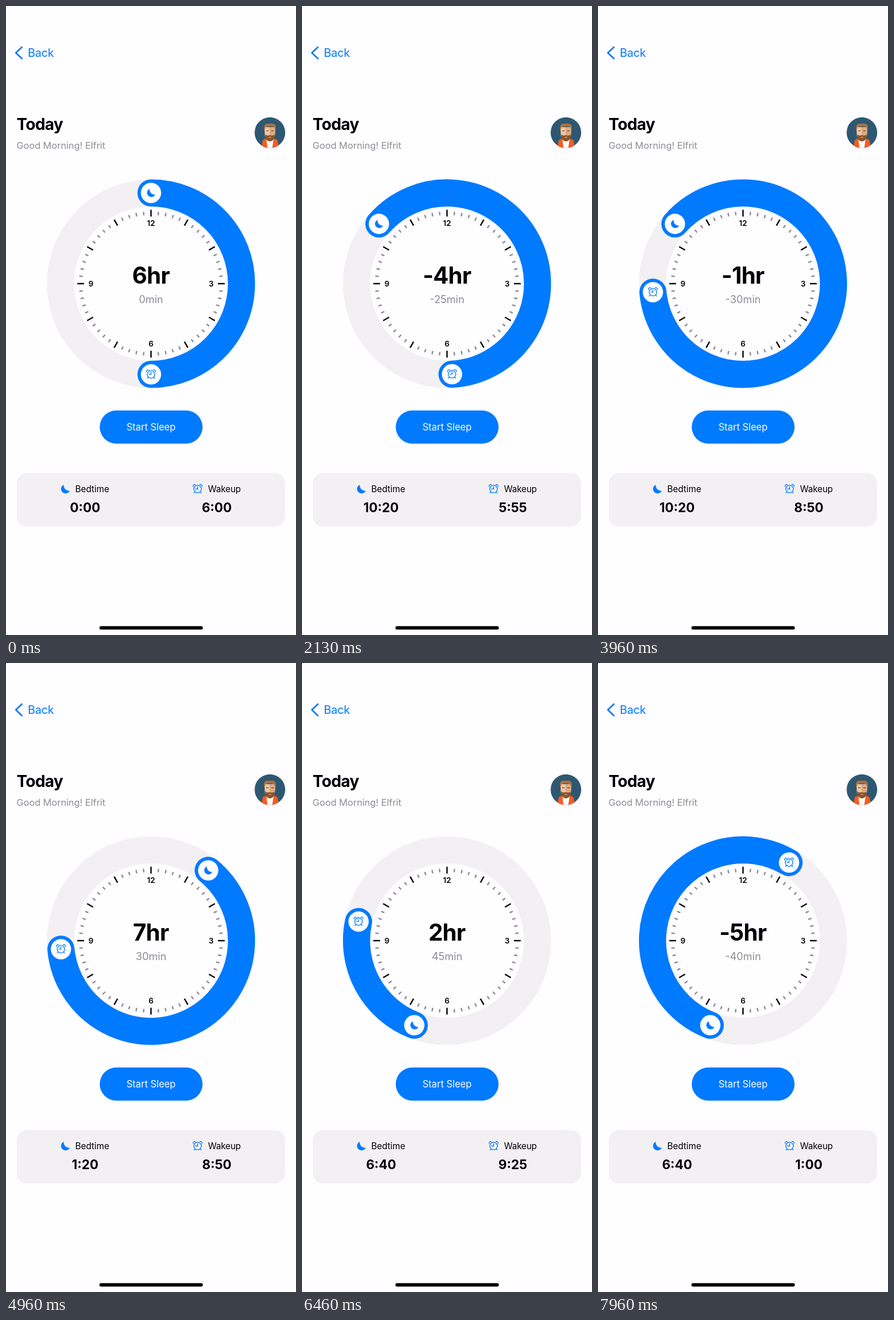
An HTML page for the animation above (8 s loop, 509 px wide and 1101 px high).

```html
<!DOCTYPE html>
<html lang="en">
<head>
<meta charset="utf-8">
<title>Sleep timer</title>
<style>
  html, body { margin: 0; width: 100%; height: 100%; overflow: hidden; background: #fefdff; }
  svg { display: block; width: 509px; height: 1101px; font-family: Inter, Roboto, sans-serif; font-optical-sizing: none; }
  .blue { fill: #007aff; }
  .track { fill: #f3f0f3; }
  .gray { fill: #8e8c92; }
  .mid { text-anchor: middle; }
  .line { fill: none; stroke: #007aff; stroke-linecap: round; stroke-linejoin: round; }
  .num { font-size: 13.5px; font-weight: 600; text-anchor: middle; }
  .time { font-size: 22.6px; font-weight: 700; text-anchor: middle; }
  .label { font-size: 15.4px; }
</style>
</head>
<body>
<svg viewBox="0 0 509 1101">
  <defs>
    <path id="moon" class="blue" d="M-2.6-7.6A8 8 0 1 0 7.9 3A9.5 9.5 0 0 1-2.6-7.6Z"/>
    <g id="alarm" class="line" stroke-width="1.35">
      <circle r="6.6"/>
      <path d="M0-4V0H-3.6M-4.8 5.2L-6.3 6.9M4.8 5.2L6.3 6.9M-7.8-4.4A2.8 2.8 0 0 1-4-7.7M7.8-4.4A2.8 2.8 0 0 0 4-7.7"/>
    </g>
    <clipPath id="round"><circle cx="463.2" cy="221.7" r="27"/></clipPath>
  </defs>

  <path class="line" stroke-width="2.7" d="M27.8 72L17.3 82L27.8 92"/>
  <text class="blue" x="38.2" y="89.3" font-size="20" letter-spacing="-.2">Back</text>

  <text x="18.6" y="217" font-size="28.3" font-weight="700" letter-spacing="-.7">Today</text>
  <text class="gray" x="18.6" y="250" font-size="16.4">Good Morning! Elfrit</text>

  <g clip-path="url(#round)">
    <circle cx="463.2" cy="221.7" r="27" fill="#2e5871"/>
    <path fill="#f65b22" d="M448 250L450 237Q451 233 457 232H470Q476 233 477 237L479 250Z"/>
    <path fill="#fff" d="M457 232H470L467 250H459Z"/>
    <path fill="#d9a27c" d="M458 229H468V235Q463 239 458 235Z"/>
    <path fill="#f2c3a0" d="M454 212H463.2V234Q454 233 454 222Z"/>
    <path fill="#e0aa84" d="M463.2 212H472.5V222Q472.5 233 463.2 234Z"/>
    <path fill="#a9713f" d="M453 219V211Q454 205 463 206Q473 205 473.5 211V219L471 212Q463 209 455.5 212Z"/>
    <path fill="#8a5428" d="M455 225Q459 228 463.2 226Q468 228 471.5 225Q472 236 463.2 237Q455 236 455 225Z"/>
    <path stroke="#5d3a22" stroke-width="1.2" d="M456.5 218.5H461M465.5 218.5H470"/>
    <path stroke="#f2c3a0" stroke-width="1.2" d="M461 230H465.5"/>
  </g>

  <circle cx="254.5" cy="486" r="158.8" fill="none" stroke="#f3f0f3" stroke-width="47.6"/>
  <path id="arc" class="line" stroke-width="47.6"/>
  <g id="ticks" stroke-width="2.4"></g>
  <g id="wakeKnob"><circle r="17.8" fill="#fff"/><use href="#alarm"/></g>
  <g id="bedKnob"><circle r="17.8" fill="#fff"/><use href="#moon" transform="scale(.93)"/></g>

  <text class="num" x="254.5" y="385">12</text>
  <text class="num" x="360" y="490.6">3</text>
  <text class="num" x="254.5" y="596">6</text>
  <text class="num" x="149" y="490.6">9</text>
  <text id="hours" class="mid" x="254.3" y="486" font-size="40.5" font-weight="700" letter-spacing="-.8"></text>
  <text id="mins" class="mid gray" x="254.6" y="520.3" font-size="18.2"></text>

  <rect class="blue" x="164.5" y="708" width="180.5" height="58" rx="29"/>
  <text class="mid" x="254.6" y="742.8" font-size="16.6" fill="#fff">Start Sleep</text>

  <rect class="track" x="19" y="817.5" width="471" height="93.5" rx="18"/>
  <use href="#moon" x="104" y="845.5"/>
  <text class="label" x="121.4" y="851.4">Bedtime</text>
  <text id="bedTime" class="time" x="138.8" y="886.4"></text>
  <use href="#alarm" x="336.3" y="845.5"/>
  <text class="label" x="354.6" y="851.4" letter-spacing="-.2">Wakeup</text>
  <text id="wakeTime" class="time" x="370" y="886.4"></text>

  <rect x="164" y="1085.6" width="181.5" height="5.8" rx="2.9"/>
</svg>

<script>
const LOOP = 8000, CX = 254.5, CY = 486, R = 158.8;
const $ = id => document.getElementById(id);

// [ms, degrees clockwise from 12]
const bedKeys = [[500, 0], [870, 48], [1230, 2.2], [1830, -48.8], [4600, -48.8], [4960, 39], [5760, 201.2]];
const wakeKeys = [[2060, 180], [2660, 98], [2900, 113.3], [3730, 258], [3960, 264.6],
  [6459, 264.6], [6460, 282], [7960, 390.6]];

const rate = (k, i) => (k[i + 1][1] - k[i][1]) / (k[i + 1][0] - k[i][0]);

// Harmonic tangents keep the curve free of overshoot
function slope(k, i) {
  if (i === 0 || i === k.length - 1) return 0;
  const p = rate(k, i - 1), q = rate(k, i);
  return p * q > 0 ? 2 * p * q / (p + q) : 0;
}

function angleAt(k, t) {
  if (t <= k[0][0]) return k[0][1];
  const i = k.findIndex(key => key[0] > t) - 1;
  if (i < 0) return k[k.length - 1][1];
  const [t0, v0] = k[i], [t1, v1] = k[i + 1];
  const d = t1 - t0, u = (t - t0) / d, w = 1 - u;
  return v0 * (1 + 2 * u) * w * w + v1 * u * u * (3 - 2 * u)
    + d * u * w * (slope(k, i) * w - slope(k, i + 1) * u);
}

function polar(deg) {
  const a = deg * Math.PI / 180;
  return [CX + R * Math.sin(a), CY - R * Math.cos(a)];
}

const wrap = (v, n) => (v % n + n) % n;
const minutes = deg => wrap(Math.round(deg * 2 / 5) * 5, 720);
const clock = m => Math.floor(m / 60) + ":" + String(m % 60).padStart(2, "0");

function setText(id, s) {
  if ($(id).textContent !== s) $(id).textContent = s;
}

function draw(t) {
  const bed = angleAt(bedKeys, t), wake = angleAt(wakeKeys, t);
  const p = polar(bed), q = polar(wake);
  const large = wrap(wake - bed, 360) > 180 ? 1 : 0;
  $("arc").setAttribute("d", `M${p}A${R} ${R} 0 ${large} 1 ${q}`);
  $("bedKnob").setAttribute("transform", `translate(${p})`);
  $("wakeKnob").setAttribute("transform", `translate(${q})`);

  const from = minutes(bed), to = minutes(wake), span = to - from;
  setText("bedTime", clock(from));
  setText("wakeTime", clock(to));
  setText("hours", Math.trunc(span / 60) + "hr");
  setText("mins", span % 60 + "min");
}

for (let i = 0; i < 60; i++) {
  const tick = document.createElementNS("http://www.w3.org/2000/svg", "path");
  const half = i % 5 ? 3 : 6;
  tick.setAttribute("d", `M0 ${-123.4 - half}V${-123.4 + half}`);
  tick.setAttribute("stroke", i % 5 ? "#8e8c92" : "#000");
  tick.setAttribute("transform", `translate(${CX} ${CY}) rotate(${i * 6})`);
  $("ticks").append(tick);
}

const start = performance.now();
function frame() {
  draw((performance.now() - start) % LOOP);
  requestAnimationFrame(frame);
}
frame();
</script>
</body>
</html>
```
